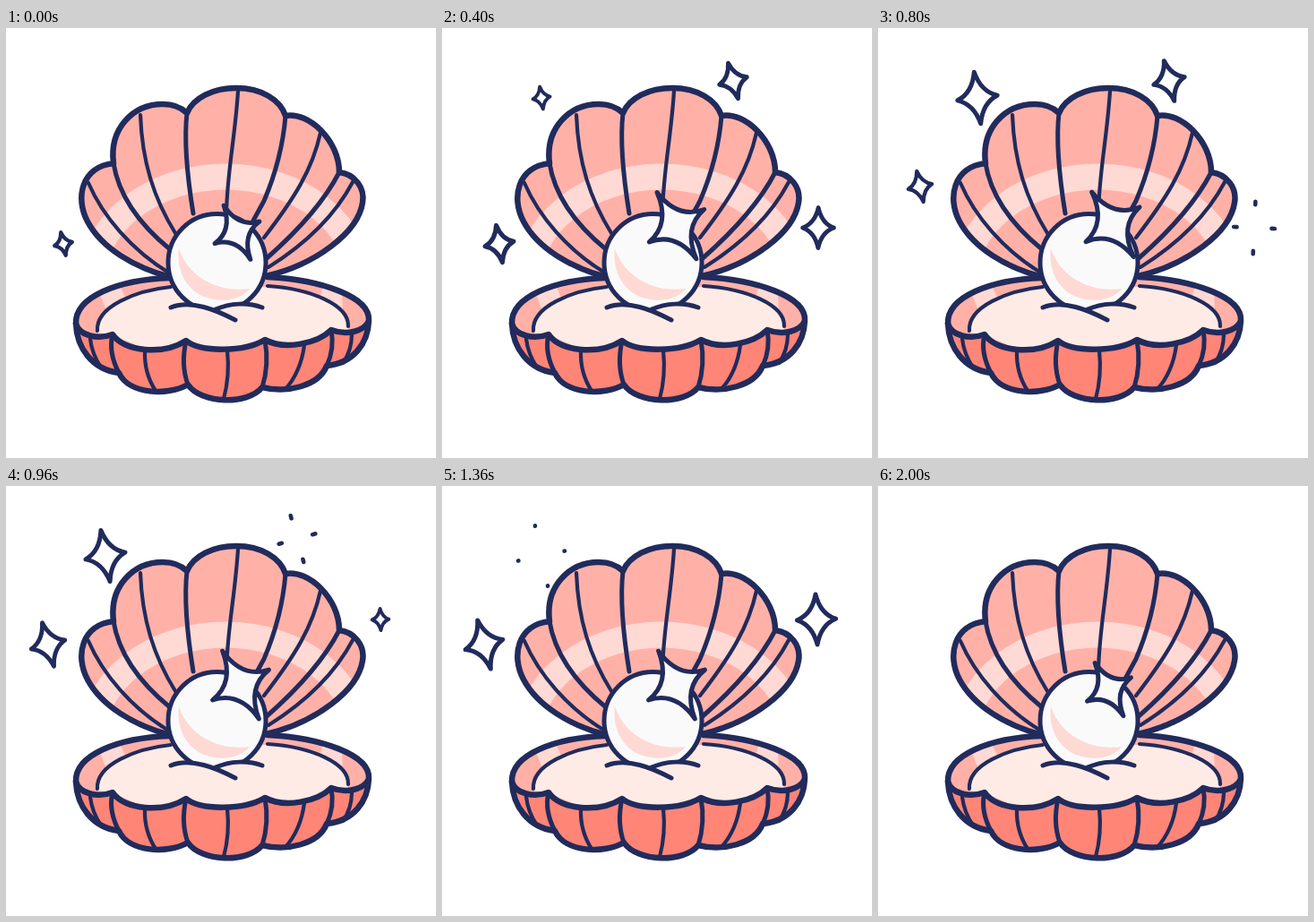
These frames come from a looping animation (480 by 480 pixels, 2.08 s). An HTML page:

```html
<!DOCTYPE html>
<html lang="en">
<head>
<meta charset="utf-8">
<title>Pearl in a shell</title>
<style>
  html, body { margin: 0; width: 100%; height: 100%; overflow: hidden; background: #fff; }
  svg { display: block; width: 100%; height: 100%; }
  .line { fill: none; stroke: #212b5c; stroke-linecap: round; stroke-linejoin: round; stroke-width: 6.5; }
  .seam { stroke-width: 5; }
  .rib { stroke-width: 4.2; }
</style>
</head>
<body>
<svg viewBox="0 0 480 480">
  <defs>
    <path id="top" d="M183 278C143 267 107 246 91 216C77 190 84 155 120 151C115 112 142 85 175 85C187 85 196 89 202 95C209 78 231 67 257 67C285 67 306 80 312 98C338 93 372 126 372 161C389 163 401 178 398 195C393 228 346 264 290 277Z"/>
    <path id="bowl" d="M78 326C79 300 125 280 183 279H292C352 280 406 300 405 326C404 352 388 374 358 377C349 400 313 408 286 401C270 421 218 420 203 398C181 411 137 409 126 385C96 381 79 357 78 326Z"/>
    <path id="front" d="M78 330C82 344 103 348 119 342C132 362 176 365 201 349C217 362 266 362 289 348C312 360 348 352 363 337C381 344 400 338 405 327C404 352 388 374 358 377C349 400 313 408 286 401C270 421 218 420 203 398C181 411 137 409 126 385C96 381 79 357 78 330Z"/>
    <clipPath id="topClip"><use href="#top"/></clipPath>
    <clipPath id="bowlClip"><use href="#bowl"/></clipPath>
  </defs>

  <use href="#top" fill="#ffb1a8"/>
  <ellipse clip-path="url(#topClip)" cx="245" cy="285" rx="150" ry="119" fill="none" stroke="#ffd9d4" stroke-width="29"/>
  <path class="line rib" d="M92 173C108 210 140 248 183 274M150 97C152 150 165 190 189 229M259 70C256 120 247 160 246 206M351 117C342 158 322 190 288 234M387 172C368 208 336 240 293 267"/>
  <path class="line seam" d="M120 151C126 188 150 220 183 247M202 95C198 130 203 170 209 207M312 98C309 135 300 165 288 193L276 215M372 161C354 196 324 228 291 257"/>
  <use href="#top" class="line"/>

  <use href="#bowl" fill="#ffb1a8"/>
  <path clip-path="url(#bowlClip)" fill="#ffd9d4" d="M104 295L126 285L134 303L113 318ZM354 286L375 294L376 322L350 303Z"/>
  <path fill="#ffebe5" d="M102 340C98 311 145 292 184 289H292C340 291 383 309 382 337L350 352L289 350L240 360L200 351L160 360L119 343Z"/>
  <path class="line rib" d="M102 338C100 311 145 293 184 289M292 288C340 291 383 309 382 333"/>
  <use href="#front" fill="#ff8577"/>
  <path class="line rib" d="M94 347Q96 364 106 379M155 360Q154 385 167 405M247 360Q250 388 243 414M333 354Q329 384 312 403M386 342Q386 360 376 374"/>
  <path class="line seam" d="M119 342Q114 362 126 385M201 349Q195 376 203 398M289 348Q294 376 286 401M363 337Q367 358 358 377"/>
  <use href="#front" class="line"/>
  <path class="line" d="M78 330C77 300 125 281 183 279M292 278C352 281 406 300 405 326"/>

  <circle cx="235.5" cy="262" r="54.5" fill="#fafafb"/>
  <path fill="#ffd9d4" d="M193 246C203 277 235 296 272 291C262 304 240 307 221 300C200 291 190 269 193 246Z"/>
  <circle class="line seam" cx="235.5" cy="262" r="54.5"/>
  <path fill="#ffebe5" d="M184 312C205 304 222 310 236 312C251 307 270 306 286 312L292 322L240 340L184 322Z"/>
  <path class="line seam" d="M184 312C207 303 235 315 256 326M234 314C250 307 270 306 286 312"/>

  <path id="glint" class="line seam" style="fill:#fafafb"/>
  <g id="sparkles"></g>
</svg>
<script>
const STEP = 80, COUNT = 26, BURST_STEPS = 3, GROW_STEPS = 7;

// Each sparkle grows from its start step, then breaks into four streaks.
const sparkles = [
  { x: 64, y: 241, size: 21, tilt: -10, start: -2, burst: 6 },
  { x: 47, y: 177, size: 28, tilt: -14, start: 8, burst: 20 },
  { x: 111, y: 78, size: 29, tilt: -9, start: 4, burst: 15 },
  { x: 325, y: 59, size: 23, tilt: -16, start: 1, burst: 11 },
  { x: 420, y: 223, size: 25, tilt: 0, start: 1, burst: 9 },
  { x: 418, y: 149, size: 28, tilt: -1, start: 11, burst: 22 }
];

const glint = document.getElementById("glint");
const group = document.getElementById("sparkles");
for (const s of sparkles) {
  s.node = document.createElementNS("http://www.w3.org/2000/svg", "path");
  s.node.setAttribute("class", "line");
  group.append(s.node);
}

const easeOut = k => Math.sin(Math.min(1, k) * Math.PI / 2);
const swayAt = step => Math.cos(2 * Math.PI * (step - 8) / 13);

// Direction and length of the four arms, clockwise from the top.
function arms(size, tilt, ratio) {
  return [0, 1, 2, 3].map(i => {
    const angle = (tilt + i * 90) * Math.PI / 180;
    return { ux: Math.sin(angle), uy: -Math.cos(angle), len: size * (i % 2 ? ratio : 1) };
  });
}

function starPath(x, y, tips, pinch) {
  const points = tips.map(({ ux, uy, len }) => [ux * len, uy * len]);
  return points.reduce((d, [px, py], i) => {
    const [nx, ny] = points[(i + 1) % 4];
    return d + `Q${x + (px + nx) * pinch} ${y + (py + ny) * pinch} ${x + nx} ${y + ny}`;
  }, `M${x + points[0][0]} ${y + points[0][1]}`) + "Z";
}

function burstPath(x, y, tips, age) {
  const reach = 1.02 + age * 0.08, half = 3.2 - age * 1.5;
  return tips.map(({ ux, uy, len }) => {
    const from = len * reach - half, to = len * reach + half;
    return `M${x + ux * from} ${y + uy * from}L${x + ux * to} ${y + uy * to}`;
  }).join("");
}

function drawGlint(step) {
  const sway = swayAt(step);
  const grown = easeOut(Math.min(step, COUNT - 1 - step) / 4);
  const tips = arms(33.5 + 9.5 * grown, -30 - 5 * sway, 0.83);
  glint.setAttribute("d", starPath(258 + 4 * grown, 226 - 5 * grown - 3 * sway, tips, 0.13));
}

function drawSparkle({ node, x, y, size, tilt, start, burst }, step) {
  const shown = step >= start && step < burst + BURST_STEPS;
  node.style.display = shown ? "" : "none";
  if (!shown) return;
  const grown = easeOut((step - start + 1) / GROW_STEPS);
  const tips = arms(size * grown, tilt + 3 * swayAt(Math.min(step, burst)), 0.77);
  const whole = step < burst;
  node.setAttribute("d", whole ? starPath(x, y, tips, 0.22) : burstPath(x, y, tips, step - burst));
  node.style.strokeWidth = whole ? 3 + 2 * grown : 4.6;
}

function draw(time) {
  const step = Math.floor(time / STEP) % COUNT;
  drawGlint(step);
  sparkles.forEach(s => drawSparkle(s, step));
}

let origin;
function tick(now) {
  origin ??= now;
  draw(now - origin);
  requestAnimationFrame(tick);
}
draw(0);
requestAnimationFrame(tick);
</script>
</body>
</html>
```
